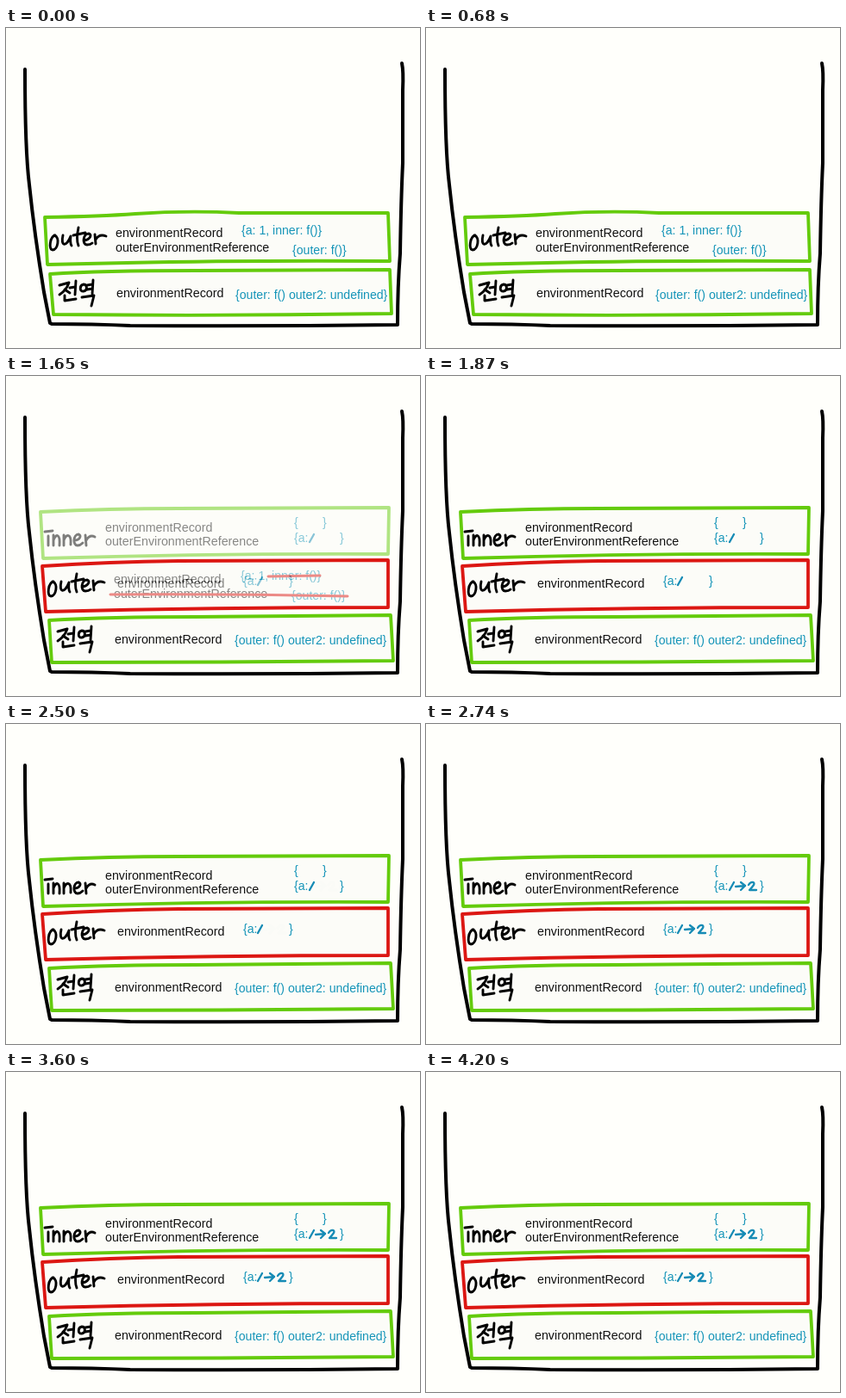
Animation, 480 px wide and 372 px high, one loop 4.23 s. Source, as an HTML page:

```html
<!DOCTYPE html>
<html lang="ko">
<head>
<meta charset="utf-8">
<title>Execution contexts</title>
<style>
html, body { margin: 0; width: 100%; height: 100%; overflow: hidden; background: #fffffb; }
svg { display: block; width: 480px; height: 372px; }
text { font: 14.25px "Liberation Sans", Arial, sans-serif; fill: #111; white-space: pre; }
.blue { font-size: 14.1px; fill: #1494b8; }
path { fill: none; stroke: #000; stroke-width: 2.9; stroke-linecap: round; stroke-linejoin: round; }
.wall { stroke-width: 4; }
.box { stroke-width: 3.8; fill: #fcfcf8; }
.green { stroke: #64cb0c; }
.red { stroke: #dc1713; }
.strike { stroke: #dc1713; stroke-width: 3; }
.note { stroke: #168bb5; stroke-width: 2.3; }
</style>
</head>
<body>
<svg id="stage" viewBox="0 0 480 372"></svg>
<script>
const LOOP = 4230;

const path = (cls, d, dx = 0, dy = 0) =>
  `<path class="${cls}" d="${d}" transform="translate(${dx} ${dy})"/>`;
const text = (x, y, s, cls = '') => `<text class="${cls}" x="${x}" y="${y}">${s}</text>`;
const blue = (x, y, s) => text(x, y, s, 'blue');

// Handwriting strokes
const INK = {
  outer: 'M55 239C49 240 47 256 52 256C58 256 61 241 54 239M64 239C61 252 68 253 73 240Q72 248 74 251' +
    'M82 230Q79 244 82 251M76 239L90 236M88 245C96 244 98 238 94 237C87 237 86 250 92 250Q96 250 98 248' +
    'M101 238L102 249M102 244Q106 237 114 240',
  inner: 'M45 181L54 180M49 186L49 197M55 185L55 197M55 191C58 183 63 183 62 197M67 185L67 197' +
    'M67 191C70 183 76 183 75 196M79 191C86 191 88 185 84 184C78 184 77 197 83 197Q86 197 89 194' +
    'M92 185L93 197M93 191Q97 184 103 187',
  global: 'M60 297L71 294Q68 303 60 308M66 302L72 306M79 292L78 308M72 300L78 299M66 309L66 315L79 313' +
    'M88 296C83 297 83 305 88 304C93 303 92 296 88 296M99 291L98 307M92 297L98 296M92 302L98 301' +
    'M86 311L100 309L97 321'
};
const ONE = 'M352 193L357 184';
const TO_TWO = 'M359 189L370 188M365 184L370 188L365 193M374 187C377 182 382 184 380 187Q378 190 375 193L383 193';

const WALLS = path('wall', 'M22 48C22 100 23 150 27 182Q33 240 44 307L51 343L53 344' +
  'Q100 344 144 346Q300 347 454 345Q454 300 457 262Q458 200 460 157V72Q461 50 459 41');
const RED_BOX = path('box red', 'M42 221Q120 216 200 215L443 214L443 269Q240 269 46 274Z');
const GLOBAL = path('box green', 'M50 284Q120 280 220 280L446 278L449 331Q250 333 53 333Z') +
  path('', INK.global) + text(126, 311, 'environmentRecord') +
  blue(265, 312, '{outer: f() outer2: undefined}');
const OUTER = RED_BOX + path('', INK.outer);

const started = path('box green', 'M45 220Q110 219 150 216Q210 212 270 215L443 215L445 271Q270 270 140 273L48 275Z') +
  path('', INK.outer, 2, 2) +
  text(127, 243, 'environmentRecord') + text(127, 260, 'outerEnvironmentReference') +
  blue(273, 240, '{a: 1, inner: f()}') + blue(332, 263, '{outer: f()}') +
  path('box green', 'M51 286Q110 282 220 282L445 281L447 332Q250 335 55 333Z') + path('', INK.global, 2, 2) +
  text(128, 313, 'environmentRecord') + blue(266, 315, '{outer: f() outer2: undefined}');

const struck = OUTER + GLOBAL +
  text(125, 241, 'environmentRecord') + text(125, 258, 'outerEnvironmentReference') +
  blue(272, 237, '{a: 1, inner: f()}') + blue(331, 260, '{outer: f()}') +
  path('strike', 'M304 233L364 232') + path('strike', 'M121 254Q260 253 396 256');

const called = OUTER + GLOBAL +
  path('box green', 'M40 158Q120 154 200 154L444 153L443 207Q240 206 43 212Z') + path('', INK.inner) +
  text(115, 181, 'environmentRecord') + text(115, 197, 'outerEnvironmentReference') +
  blue(334, 175, '{') + blue(367, 175, '}') + blue(334, 193, '{a:') + blue(387, 193, '}') +
  text(129, 246, 'environmentRecord') + blue(275, 243, '{a:') + blue(328, 243, '}') +
  path('note', ONE) + path('note', ONE, -60, 50);

const changed = called + path('note', TO_TWO) + path('note', TO_TWO, -59, 50);

// Each scene dissolves over the one before it
const scenes = [
  { body: started, at: -1, fade: 1 },
  { body: struck, at: 740, fade: 240 },
  { body: called, at: 1520, fade: 260 },
  { body: changed, at: 2500, fade: 230 }
];
const stage = document.getElementById('stage');
stage.innerHTML = scenes.map(s =>
  `<g><rect width="480" height="372" fill="#fffffb"/>${WALLS}${s.body}</g>`).join('');

const start = performance.now();
function draw() {
  const t = (performance.now() - start) % LOOP;
  scenes.forEach((s, i) => {
    stage.children[i].style.opacity = Math.min(1, Math.max(0, (t - s.at) / s.fade));
  });
  requestAnimationFrame(draw);
}
draw();
</script>
</body>
</html>
```
